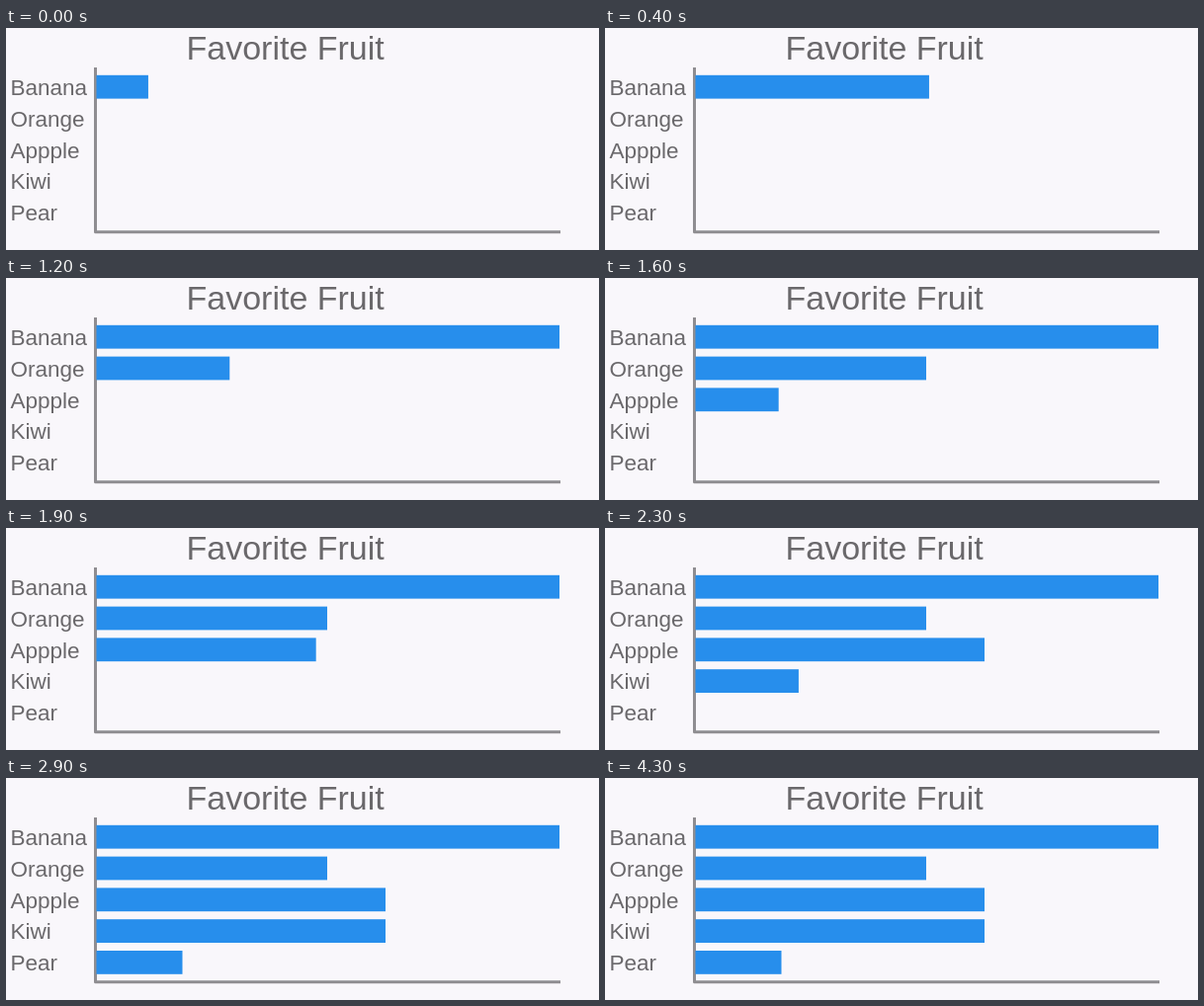
Recreate the animation shown at these times as an HTML page. Size 600x225 px, loop 4.6 s.

```html
<!DOCTYPE html>
<html lang="en">
<head>
<meta charset="utf-8">
<title>Favorite Fruit</title>
<style>
  html, body { margin: 0; width: 100%; height: 100%; overflow: hidden; background: #f9f7fb; }
  svg { display: block; width: 600px; height: 225px; }
  text { font: 22.5px "Liberation Sans", Arial, sans-serif; fill: #6a686b; }
  .title { font-size: 34px; }
  .bar { fill: #278eec; }
  .axis { fill: none; stroke: #8f8d91; stroke-width: 3; stroke-linejoin: round; }
</style>
</head>
<body>
<svg id="chart" viewBox="0 0 600 225">
  <text class="title" x="182.5" y="32">Favorite Fruit</text>
  <path class="axis" d="M90.5 40V206.8H561"/>
</svg>
<script>
const LOOP = 4600, STEP = 100, SPEED = 0.46;
const LEFT = 91.5, TOP = 47.8, ROW = 31.8, THICKNESS = 23.8;

// start in ms, right edge in px
const rows = [
  { label: 'Banana', start: -114, end: 560 },
  { label: 'Orange', start: 907, end: 325 },
  { label: 'Appple', start: 1417, end: 384 },
  { label: 'Kiwi', start: 2073, end: 384 },
  { label: 'Pear', start: 2709, end: 178.5 }
];

const chart = document.getElementById('chart');

function add(name, attributes, text = '') {
  const node = document.createElementNS(chart.namespaceURI, name);
  for (const key in attributes) node.setAttribute(key, attributes[key]);
  node.textContent = text;
  return chart.appendChild(node);
}

rows.forEach((row, i) => {
  const y = TOP + i * ROW;
  add('text', { x: 4.5, y: y + 20.2 }, row.label);
  row.bar = add('rect', { class: 'bar', x: LEFT, y, width: 0, height: THICKNESS });
});

function draw(now) {
  const time = Math.floor((now % LOOP) / STEP) * STEP;
  for (const { bar, start, end } of rows) {
    const width = Math.min(Math.max((time - start) * SPEED, 0), end - LEFT);
    bar.setAttribute('width', width);
  }
}

const origin = performance.now();
function tick() {
  draw(performance.now() - origin);
  requestAnimationFrame(tick);
}
tick();
</script>
</body>
</html>
```
